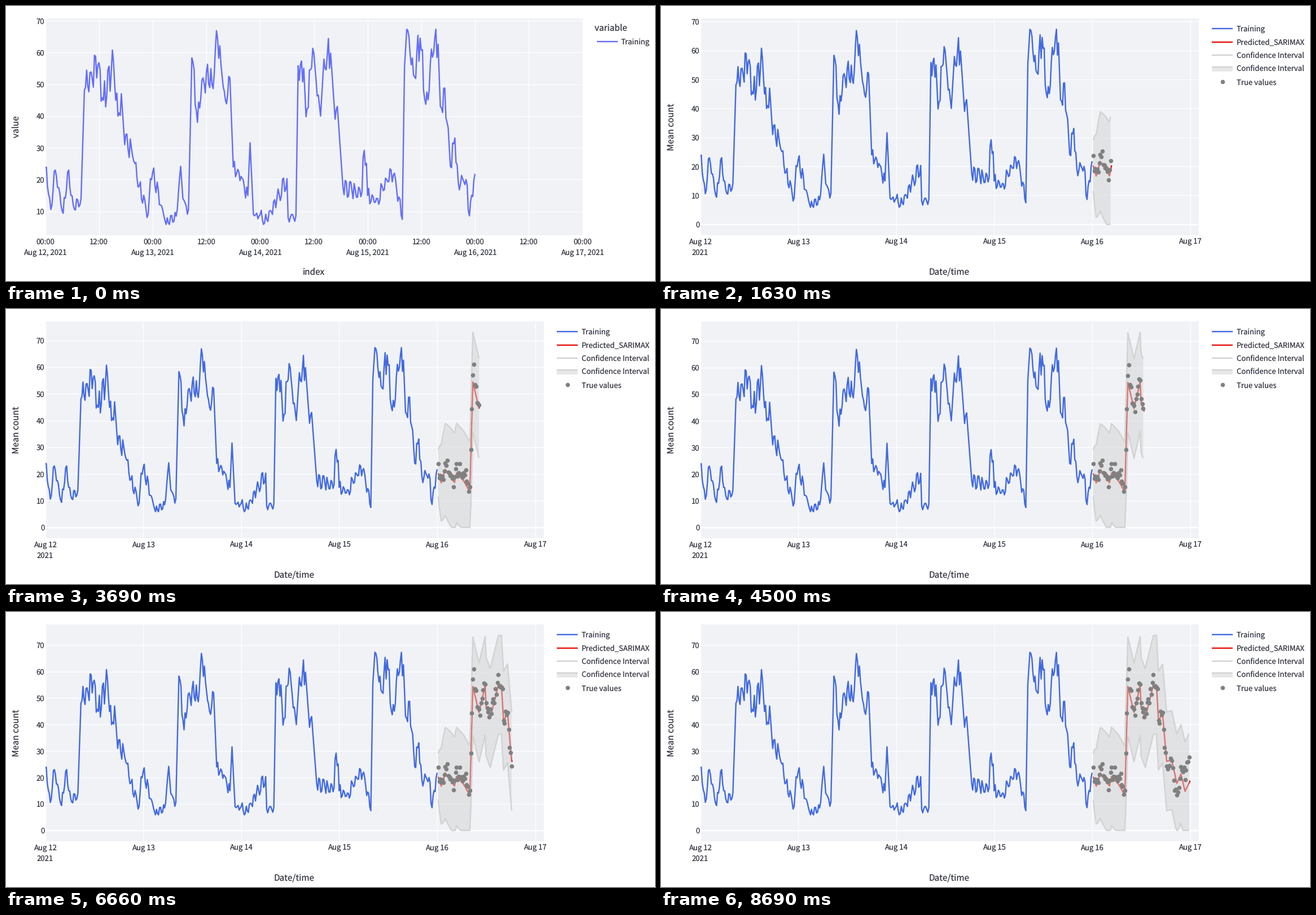
A matplotlib script for the animation above (9880 ms loop, 1150 px wide and 487 px high).

```python
import numpy as np
import matplotlib.pyplot as plt
from matplotlib.animation import FuncAnimation

W, H, DPI = 1150, 487, 100
LOOP, INTERVAL = 9880, 40
LEFT, TOP, BOTTOM = 69.5, 22, 406
SLOTS = 96  # quarter hours per day
FLOOR, CEILING = 5.9, 67.3
INK, PANEL, GREY, BAND = "#31333f", "#f0f2f6", "#808080", "#d3d3d3"
INDIGO, BLUE, RED = "#636efa", "#4169e1", "#e6120b"


def pt(px):
    return px * 72 / DPI


SMALL, LARGE, LINE = pt(13.15), pt(15.3), pt(2.4)
plt.rcParams.update({"font.family": "Noto Sans CJK JP", "text.color": INK,
                     "text.hinting": "none", "lines.solid_capstyle": "butt"})
rng = np.random.default_rng(12)


def curve(points, at):
    return np.interp(at, *zip(*points))


def noisy_day(points):
    """Pass through the key points, with jitter that grows with the level between."""
    slots = np.arange(SLOTS)
    level = curve(points, slots)
    side = np.where(slots % 4 < 2, 1, -1)
    jitter = side * rng.uniform(0, 1.5, SLOTS) * (1 + 0.05 * level)
    jitter[[slot for slot, _ in points]] = 0
    steep = np.abs(np.gradient(level)) > 5
    return np.clip(level + np.where(steep, 0, jitter), FLOOR, CEILING)


# Key points of each day: (quarter hour, value)
thursday = [(0, 23.6), (5, 10.6), (9, 23), (16, 9.4), (21, 23), (25, 12), (32, 14),
            (35, 48.2), (47, 56), (52, 45), (61, 57), (65, 40), (68, 47), (71, 31),
            (77, 30), (84, 18), (92, 9.1), (94, 20.3)]
friday = [(0, 22.3), (12, 5.9), (21, 8.5), (25, 24.2), (27, 14), (32, 10.6), (35, 58.3),
          (40, 38), (45, 52), (53, 50), (58, 64.3), (65, 45), (69, 52), (72, 24),
          (79, 21), (85, 15), (87, 31.6), (90, 9)]
saturday = [(0, 9), (4, 6.4), (15, 14), (24, 20.3), (25, 8), (32, 8.7), (34, 55.8),
            (39, 55), (41, 39.8), (47, 61.3), (54, 40), (57, 57.9), (63, 59.8), (67, 39),
            (69, 43), (74, 17.6), (91, 16), (92, 27)]
sunday = [(0, 15), (9, 14), (21, 23), (25, 20), (31, 7.5), (33, 55.5), (35, 67.3),
          (41, 53), (47, 64.5), (52, 43.7), (60, 64.3), (63, 62.6), (65, 43), (69, 48.8),
          (74, 24.1), (78, 33.1), (81, 19.2), (88, 20), (91, 8.6), (95, 20)]
train_y = np.append(np.concatenate([noisy_day(day) for day in
                                    (thursday, friday, saturday, sunday)]), 21.8)
train_x = np.arange(train_y.size) / SLOTS

forecast = [(1, 20.3), (4, 16.7), (8, 21.7), (17, 16.8), (19, 20.4), (26, 17.4),
            (32, 13.3), (35, 54.4), (41, 44.6), (47, 54.6), (48, 46.7), (52, 42.5),
            (60, 55), (63, 55.1), (65, 41.5), (69, 44.2), (73, 26.1), (78, 26.6),
            (83, 17.8), (87, 21.3), (91, 14.8), (96, 18.8)]
drift = [(1, 2), (30, 1), (36, 6), (41, -2), (46, 2), (76, 0), (84, -6), (88, 5), (95, 9)]
slot = np.arange(1, SLOTS + 1)
day_x = 4 + slot / SLOTS
predicted = curve(forecast, slot)
half = 18.65 - 9.9 * np.exp((1 - slot) / 3.7)
upper, lower = predicted + half, np.maximum(predicted - half, 0)
observed = np.clip(predicted + curve(drift, slot) + rng.normal(0, 1.9, SLOTS), 9.4, 61)

# Slightly uneven playback: (time in ms, known quarter hours)
pace = [(70, 0), (730, 8), (4500, 50), (6660, 73), (8690, 95)]

fig = plt.figure(figsize=(W / DPI, H / DPI), dpi=DPI, facecolor="white")


class View:
    """A plot panel plus a page in pixel coordinates for the labels around it."""

    def __init__(self, right, day_width, tick_step):
        self.day_width = day_width
        self.page = fig.add_axes([0, 0, 1, 1], xlim=(0, W), ylim=(H, 0))
        self.page.axis("off")
        self.plot = fig.add_axes([LEFT / W, 1 - BOTTOM / H, (right - LEFT) / W,
                                  (BOTTOM - TOP) / H], facecolor=PANEL)
        self.plot.spines[:].set_visible(False)
        self.plot.set_axisbelow(True)
        self.plot.set_xticks(np.arange(0, 5.01, tick_step))
        self.plot.set_yticks(range(0, 80, 10))
        self.plot.grid(color="white", lw=pt(1.25))
        self.plot.tick_params(length=0, pad=pt(1.2), labelsize=SMALL, labelcolor=INK)
        self.plot.tick_params(axis="x", labelbottom=False)
        self.plot.set_xlim(0, (right - LEFT) / day_width)
        self.centre = (LEFT + right) / 2

    def text(self, x, y, label, size=SMALL, **kw):
        self.page.text(x, y, label, fontsize=size, va="baseline", **kw)

    def x_label(self, day, *rows):
        for i, row in enumerate(rows):
            self.text(LEFT + day * self.day_width, 422 + 19.2 * i, row, ha="center")

    def titles(self, x_title, y_title):
        self.text(self.centre, 475.8, x_title, LARGE, ha="center")
        self.text(22.5, 213.7, y_title, LARGE, ha="center", rotation=90,
                  rotation_mode="anchor")

    def key(self, x, y, colour):
        self.page.plot([x, x + 37], [y, y], color=colour, lw=LINE)

    def fit(self, low, high):
        pad = (high - low) / 18
        self.plot.set_ylim(low - pad, high + pad)

    def show(self, on):
        self.page.set_visible(on)
        self.plot.set_visible(on)


intro = View(1022, 190.4, 0.5)
intro.titles("index", "value")
for i in range(11):
    if i % 2:
        intro.x_label(i / 2, "12:00")
    else:
        intro.x_label(i / 2, "00:00", f"Aug {12 + i // 2}, 2021")
intro.text(1043, 44, "variable", LARGE)
intro.key(1047, 62.5, INDIGO)
intro.text(1090, 67.6, "Training")
intro.plot.plot(train_x, train_y, color=INDIGO, lw=LINE)
intro.fit(FLOOR, CEILING)

live = View(952.5, 173.62, 1)
live.titles("Date/time", "Mean count")
for i in range(6):
    live.x_label(i, f"Aug {12 + i}", *["2021"] * (i == 0))
labels = ["Training", "Predicted_SARIMAX", "Confidence Interval",
          "Confidence Interval", "True values"]
for i, label in enumerate(labels):
    live.text(1019.7, 45.2 + 23.6 * i, label)
for i, colour in enumerate((BLUE, RED, BAND)):
    live.key(976, 40 + 23.7 * i, colour)
live.page.fill([976, 1013, 1013, 976], [108, 108, 115.5, 115.5], color=BAND,
               alpha=0.5, lw=0)
live.key(976, 108, BAND)
dot = dict(marker="o", ls="", color=GREY, ms=pt(7.6), mew=0)
live.page.plot([994.5], [134.2], **dot)

live.plot.axhline(0, color="white", lw=pt(2.4), zorder=0.6)
live.plot.plot(train_x, train_y, color=BLUE, lw=LINE)
guess, = live.plot.plot([], [], color=RED, lw=LINE)
low_line, = live.plot.plot([], [], color=BAND, lw=LINE)
band, = live.plot.fill([4, 4, 4], [0, 0, 0], color=BAND, alpha=0.5, lw=0, zorder=2)
high_line, = live.plot.plot([], [], color=BAND, lw=LINE)
truth, = live.plot.plot([], [], **dot)


def update(frame):
    now = frame * INTERVAL + 30
    started = now >= pace[0][0]
    intro.show(not started)
    live.show(started)
    if not started:
        return
    n = int(curve(pace, now))
    x, lo, hi = day_x[:n], lower[:n], upper[:n]
    guess.set_data(day_x[:n + 1], predicted[:n + 1])
    low_line.set_data(x, lo)
    high_line.set_data(x, hi)
    truth.set_data(x, observed[:n])
    band.set_visible(n > 1)
    if n > 1:
        band.set_xy(np.column_stack([np.append(x, x[::-1]), np.append(hi, lo[::-1])]))
    live.fit(min([FLOOR, *lo]), max([CEILING, *hi]))


anim = FuncAnimation(fig, update, frames=LOOP // INTERVAL, interval=INTERVAL,
                     init_func=lambda: update(0), repeat=True, repeat_delay=0)
plt.show()
```
